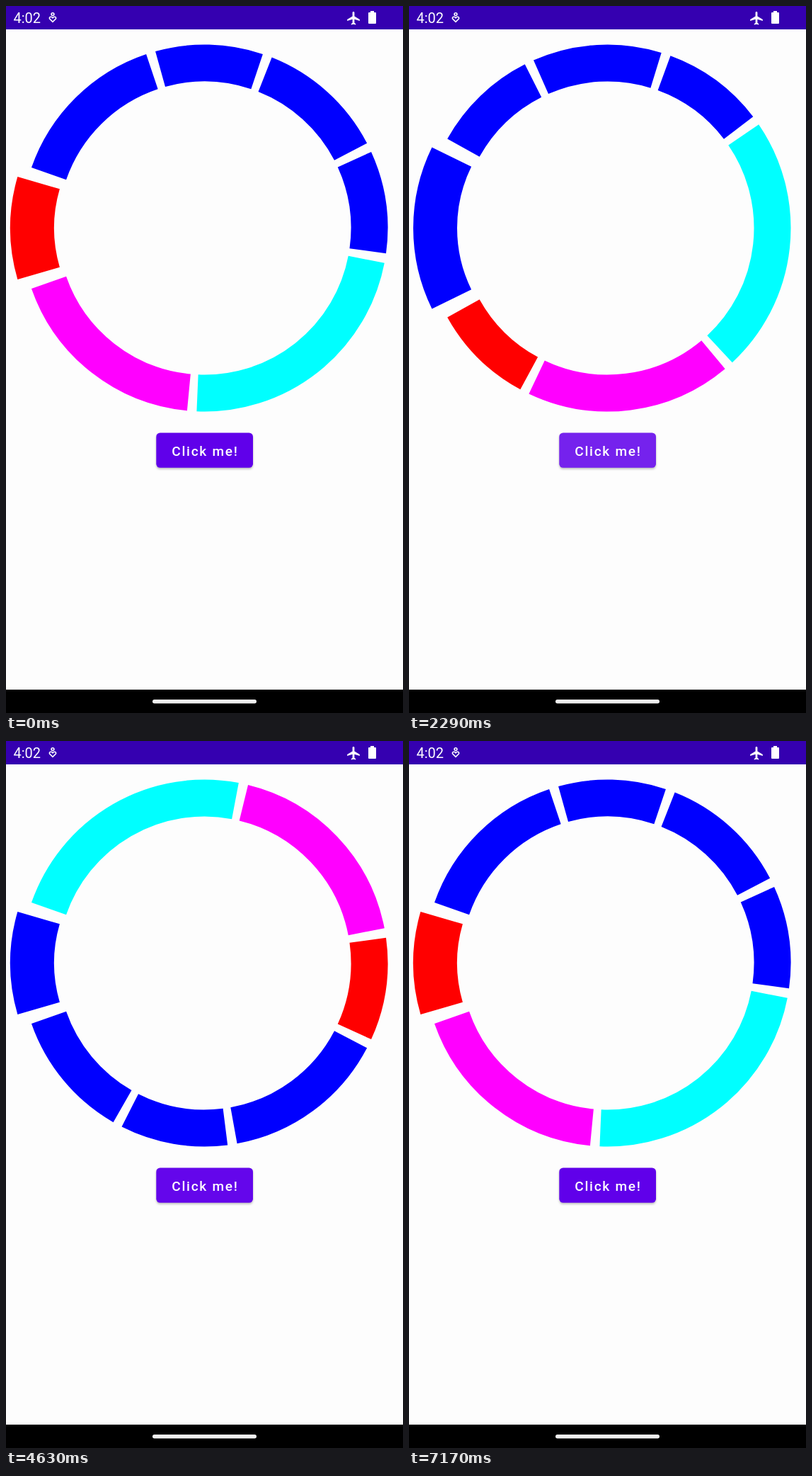
Write an HTML page that moves like this. It is 561x998 px and loops after 7.21 s.

```html
<!DOCTYPE html>
<html lang="en">
<head>
<meta charset="utf-8">
<title>Ring selector</title>
<style>
  html, body { margin: 0; height: 100%; overflow: hidden; background: #fdfdfd; }
  svg { display: block; width: 100vw; height: 100vh; }
  text { font-family: Roboto, sans-serif; fill: #fff; }
  #button { filter: drop-shadow(0 2px 1.5px rgba(0, 0, 0, .25)); }
</style>
</head>
<body>
<svg viewBox="0 0 561 998">
  <rect width="561" height="998" fill="#fdfdfd"/>

  <!-- status bar -->
  <rect width="561" height="33" fill="#3500b0"/>
  <text x="10.5" y="24" font-size="20">4:02</text>
  <g fill="none" stroke="#fff" stroke-width="1.6">
    <circle cx="66" cy="11.6" r="1.9"/>
    <path d="M66 22.4L61.8 18.2C60.2 16 63.6 13.6 66 16.8C68.4 13.6 71.8 16 70.2 18.2Z"/>
  </g>
  <path fill="#fff" transform="translate(480.3 6.1) scale(.93)"
    d="M21 16v-2l-8-5V3.5c0-.83-.67-1.5-1.5-1.5S10 2.67 10 3.5V9l-8 5v2l8-2.5V19l-2 1.5V22l3.5-1 3.5 1v-1.5L13 19v-5.5l8 2.5z"/>
  <path fill="#fff" d="M515 7h5v2h2q1 0 1 1v14q0 1-1 1h-9q-1 0-1-1v-14q0-1 1-1h2z"/>

  <g id="ring" fill="none" transform="translate(280.5 313.5)"></g>

  <rect id="button" x="212.3" y="602.5" width="136.7" height="49.3" rx="5.5" fill="#6000ea"/>
  <rect id="ripple" x="212.3" y="602.5" width="136.7" height="49.3" rx="5.5" fill="#fff" opacity="0"/>
  <text x="234.3" y="635" font-size="19.1" font-weight="500" letter-spacing="1.7">Click me!</text>

  <!-- navigation bar -->
  <rect y="965" width="561" height="33" fill="#000"/>
  <rect x="207" y="979" width="147" height="5.4" rx="2.7" fill="#f0f0f0"/>
</svg>
<script>
const LOOP = 7210, GAP = 3, PRESS = 50;
const SPRING = Math.sqrt(1500) / 1000;
const clicks = [1860, 2540, 3345, 4060, 4775, 5450, 6121];
const slices = [
  [32.5, '#f00'], [52.2, '#00f'], [34.1, '#00f'], [40.9, '#00f'],
  [32.5, '#00f'], [81.5, '#0ff'], [65.3, '#f0f']
];

const ring = document.getElementById('ring');
const ripple = document.getElementById('ripple');
const clamp = x => Math.max(0, Math.min(1, x));

// Middle angle of every slice, measured from the middle of the first.
let edge = -slices[0][0] / 2;
const mids = slices.map(([sweep]) => {
  const mid = edge + sweep / 2;
  edge += sweep + GAP;
  return mid;
});

const arcs = slices.map(([, color]) => {
  const path = document.createElementNS('http://www.w3.org/2000/svg', 'path');
  path.setAttribute('stroke', color);
  return ring.appendChild(path);
});

function drawArc(i, angle, selected) {
  const r = selected ? 228 : 233;
  const half = slices[i][0] * Math.PI / 360;
  const x = r * Math.cos(half), y = r * Math.sin(half);
  arcs[i].setAttribute('d', `M${x} ${-y}A${r} ${r} 0 0 1 ${x} ${y}`);
  arcs[i].setAttribute('stroke-width', selected ? 62 : 52);
  arcs[i].setAttribute('transform', `rotate(${angle}) translate(${selected ? 15.5 : 0})`);
}

// Critically damped spring from 0 to 1.
const settle = ms => 1 - (1 + SPRING * ms) * Math.exp(-SPRING * ms);

function draw(t) {
  const count = clicks.filter(c => c <= t).length;
  const current = count % slices.length;
  let turn = 0;
  if (count) {
    const from = mids[count - 1];
    turn = from + (mids[current] - from) * settle(t - clicks[count - 1]);
  }
  arcs.forEach((_, i) => drawArc(i, 180 + mids[i] - turn, i === current));

  const press = clicks.filter(c => c - PRESS <= t).pop();
  const age = press ? t - press + PRESS : 1e4;
  ripple.setAttribute('opacity', .24 * Math.min(clamp(age / 75), clamp((650 - age) / 300)));
}

const start = performance.now();
function tick() {
  draw((performance.now() - start) % LOOP);
  requestAnimationFrame(tick);
}
tick();
</script>
</body>
</html>
```
